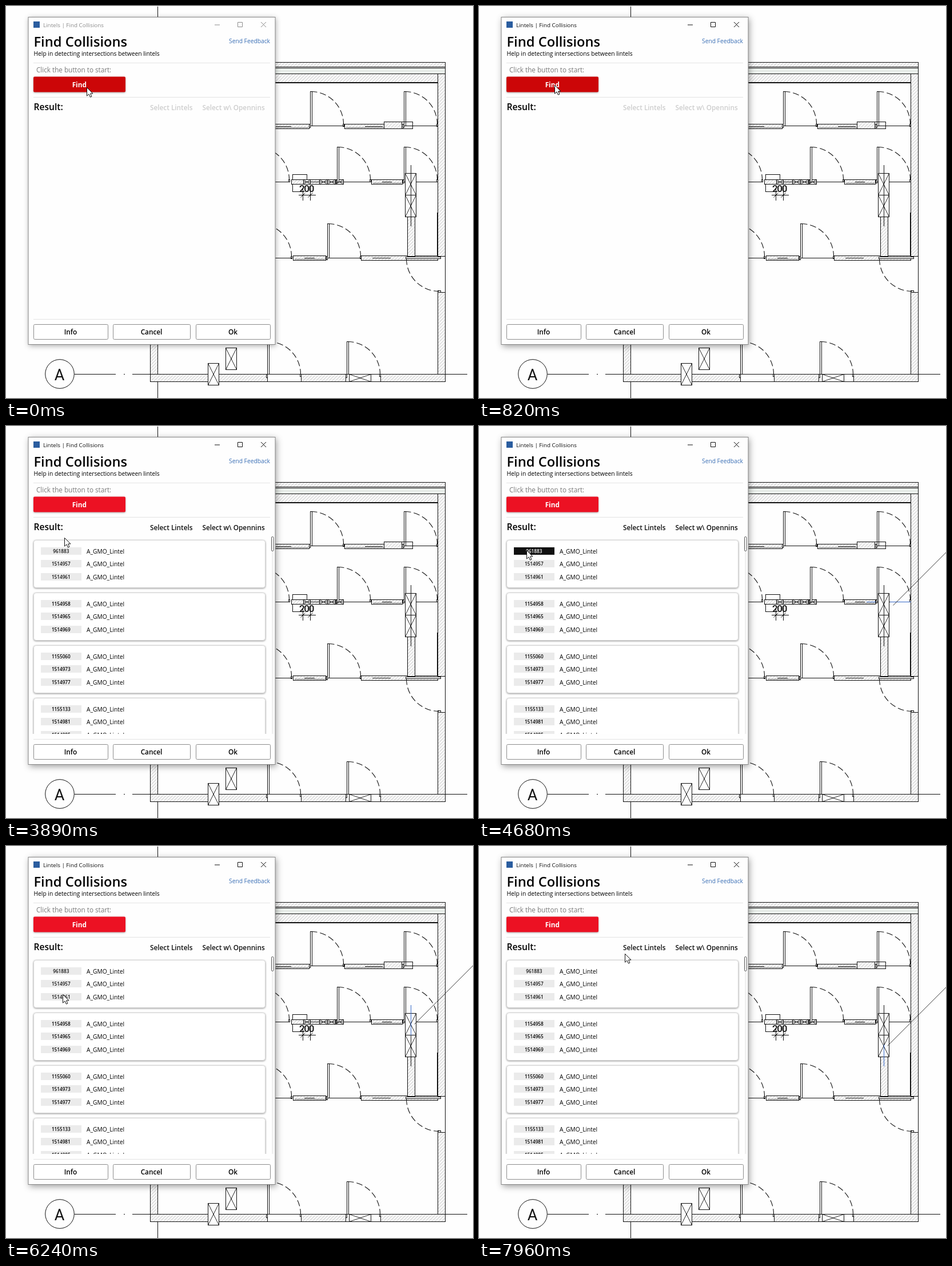
Recreate the animation shown at these times as an HTML page. Size 817 by 685 pixels, loop 8 s.

```html
<!DOCTYPE html>
<html lang="en">
<head>
<meta charset="utf-8">
<title>Find Collisions</title>
<style>
  html, body { margin: 0; width: 100%; height: 100%; overflow: hidden; background: #fefefe; }
  svg { display: block; width: 817px; height: 685px; font-family: "Open Sans", "Noto Sans", sans-serif; }
  .plan { fill: none; stroke: #111; stroke-width: 1; }
  .crisp { shape-rendering: crispEdges; }
  .arc { stroke-dasharray: 11 5; stroke-width: 1.1; }
  .cad { font-family: Roboto, "Liberation Sans", sans-serif; fill: #111; stroke: none; }
  .semi { font-weight: 600; }
  .mid { text-anchor: middle; }
</style>
</head>
<body>
<svg id="stage" viewBox="0 0 817 685">
  <defs>
    <pattern id="hatch" width="4" height="4" patternUnits="userSpaceOnUse" patternTransform="rotate(45)">
      <rect width="4" height="4" fill="#fefefe"/>
      <path d="M2 0V4" stroke="#b4b4b4" stroke-width=".8"/>
    </pattern>
    <clipPath id="listClip"><rect x="40" y="190" width="420" height="348"/></clipPath>
  </defs>
  <rect width="817" height="685" fill="#fefefe"/>
  <g id="plan" class="plan" transform="translate(.5 .5)"></g>
  <g id="dialog"></g>
  <path id="cursor" d="M.5 .5V15.2L4 11.9L6.4 17.2L8.9 16.1L6.6 11H11Z" fill="#fff" stroke="#111" stroke-linejoin="round"/>
</svg>
<script>
const $ = id => document.getElementById(id);
const LOOP = 8000;

// Markup helpers
const path = (d, extra = '') => `<path d="${d}" ${extra}/>`;
const line = (d, extra = '') => path(d, `class="crisp" ${extra}`);
const rect = (x, y, w, h, extra = '') => `<rect x="${x}" y="${y}" width="${w}" height="${h}" ${extra}/>`;
const text = (x, y, size, str, extra = '') => `<text x="${x}" y="${y}" font-size="${size}" ${extra}>${str}</text>`;

// Floor plan helpers
const DOOR = 57;
const box = (x, y, w, h, fill = 'none') => rect(x, y, w, h, `class="crisp" fill="${fill}"`);
const wall = (x, y, w, h) => box(x, y, w, h, 'url(#hatch)');
const crossed = (x, y, w, h) => box(x, y, w, h, '#fefefe') +
  path(`M${x} ${y}l${w} ${h}M${x + w} ${y}l${-w} ${h}`, 'stroke-width=".9"');
const beam = (x, y, w) => wall(x, y, w, 8) +
  line(`M${x + 2} ${y + 6}h${w - 4}`, 'stroke="#777"') + line(`M${x + w * .35} ${y + 4}h${w * .3}`);
// The leaf swings from the wall face; the sill line runs along the wall axis.
const door = (x, face, sill) => box(x - 1, face - DOOR, 3, sill - face + DOOR, '#fefefe') +
  path(`M${x} ${face - DOOR}A${DOOR} ${DOOR} 0 0 1 ${x + DOOR} ${face}`, 'class="arc"') +
  line(`M${x} ${sill}h${DOOR}`) + box(x + DOOR - 1, face, 2, 4) + box(x - 3, face, 2, 6);

function planMarkup() {
  const axes = line('M265 0V685M119 643H191M205 643h2M220 643H806') +
    '<circle cx="93.5" cy="642.5" r="25.3"/>' + text(93, 653, 27, 'A', 'class="cad mid"');

  const shell = wall(440, 98, 328, 8) + rect(440, 108, 328, 10, 'fill="#e9eeea" class="crisp"') +
    wall(440, 118, 328, 15) + line('M440 134H755') +
    wall(755, 118, 13, 319) + line('M768 98V656M755 360V437M754 360V437') +
    wall(755, 500, 13, 156) + wall(252, 560, 13, 96) + wall(252, 643, 205, 13) +
    wall(516, 643, 78, 13) + wall(655, 643, 113, 13);

  const upper = beam(440, 206, 90) + beam(592, 206, 102) + door(533, 206, 209) + door(697, 206, 209) +
    wall(661, 202, 31, 12) + box(661, 202, 50, 12);

  const middle = door(438, 303, 307) + wall(499, 303, 91, 8) + box(501, 294, 25, 9) +
    line('M501 311V324H515') + crossed(520, 303, 12, 8) +
    [548, 562, 576].map(x => crossed(x, 303, 14, 8)).join('') +
    door(580, 303, 307) + line('M520 307H606') + beam(639, 303, 54) + door(697, 303, 307) +
    text(525, 324, 17, '200', 'class="cad mid" font-weight="500" letter-spacing="-1.3"') +
    line('M511 330H541M519 318V339M532 314V339') + path('M515 334l8 -8M528 334l8 -8');

  const lower = door(442, 437, 440) + beam(502, 436, 57) + door(563, 437, 440) +
    wall(621, 436, 134, 8) + line('M640 440H672') + wall(702, 368, 13, 69) +
    box(699, 438, 61, 3, '#fefefe') + line('M755 437H768M755 500H768') + box(755, 497, 5, 3) +
    path('M700 441A57 57 0 0 0 757 498', 'class="arc"');

  const bottom = door(458, 643, 643) + door(597, 643, 643) + line('M457 656H516M594 656H655') +
    crossed(600, 643, 38, 13) + crossed(384, 597, 19, 38) + crossed(353, 624, 19, 38);

  const columns = crossed(698, 292, 19, 38) + crossed(698, 330, 19, 38) + line('M708 277V384');
  const picks = line('', 'id="pick" stroke="#3568c8"') + path('', 'id="leader" stroke-width=".8"');
  return axes + shell + upper + middle + lower + bottom + columns + picks;
}

// Dialog
const groups = [
  [961883, 1514957, 1514961],
  [1154958, 1514965, 1514969],
  [1155060, 1514973, 1514977],
  [1155133, 1514981, 1514985],
];

const card = (ids, n) => {
  const top = 199 + n * 92;
  return rect(48.5, top + .5, 405, 83, 'rx="4" fill="#fff" stroke="#d2d2d2" style="filter:drop-shadow(0 1px 1.5px #0006)"') +
    ids.map((id, i) => {
      const y = top + 13 + i * 22.4;
      return rect(61, Math.round(y), 71, 13, 'class="chip" fill="#ebebeb"') +
        text(96.3, y + 10, 8.2, id, 'class="chipText mid semi"') +
        text(141, y + 11, 10.2, 'A_GMO_Lintel');
    }).join('');
};

const footButton = (x, w, label) => rect(x + .5, 556.5, w, 26, 'rx="2" fill="#fff" stroke="#8c8c8c"') +
  text(x + w / 2, 574, 11.8, label, 'class="semi mid"');

function dialogMarkup() {
  const rules = line('M48 99.5H462M48 159.5H462M48 547.5H462', 'stroke="#e4e4e4"');
  return rect(39, 19, 432, 573, 'id="frame" fill="#fff"') +
    rect(39, 19.5, 432, 572, 'fill="#fefefe" stroke="#858585"') +
    rect(48, 27, 11, 11, 'fill="#2a5d9f"') +
    text(65, 36.5, 9.85, 'Lintels | Find Collisions', 'id="title"') +
    path('M365 33h9M405.5 28.5h8v8h-8zM446 28l9 9M455 28l-9 9', 'id="controls" fill="none"') +
    text(48.5, 71, 23.7, 'Find Collisions', 'class="semi"') +
    text(48.5, 87, 10.25, 'Help in detecting intersections between lintels') +
    text(390, 65, 10.25, 'Send Feedback', 'fill="#3a6fb5"') + rules +
    text(53, 116, 11.7, 'Click the button to start:', 'fill="#7a7a7a"') +
    rect(48, 123.5, 161, 27, 'id="find" rx="2" style="filter:drop-shadow(0 1px 1.5px #0005)"') +
    text(128.3, 142, 11.8, 'Find', 'class="mid" font-weight="700" fill="#fff"') +
    text(48.5, 182, 15.6, 'Result:', 'class="semi"') +
    '<g id="actions" class="semi">' + text(252, 182, 11.8, 'Select Lintels') +
    text(343.5, 182, 11.8, 'Select w\\ Opennins') + '</g>' +
    '<g id="results">' + `<g clip-path="url(#listClip)">${groups.map(card).join('')}</g>` +
    rect(465, 194, 3, 344, 'fill="#f1f1f1"') +
    rect(464.5, 193.5, 3.5, 25, 'rx="1.7" fill="#fff" stroke="#555"') + '</g>' +
    footButton(48, 130, 'Info') + footButton(187, 135, 'Cancel') + footButton(332, 130, 'Ok');
}

$('plan').innerHTML = planMarkup();
$('dialog').innerHTML = dialogMarkup();
const chips = document.querySelectorAll('.chip');
const chipTexts = document.querySelectorAll('.chipText');

// Motion: time, x, y
const cursorKeys = [
  [0, 141, 142], [30, 141, 142], [130, 139, 150], [310, 132, 138], [3680, 132, 138],
  [4030, 86, 225], [4200, 86, 225], [4270, 83, 217], [5170, 83, 217], [5440, 88, 240],
  [6060, 88, 240], [6240, 99, 259], [6370, 98, 266], [6750, 98, 266], [6960, 99, 267],
  [7480, 99, 267], [7960, 255, 188], [LOOP, 255, 188],
];
const hovers = [[4200, 5200], [5340, 6090], [6260, 7510]];
const picks = [
  { from: 4680, line: 'M677 307H693M718 307H755', leader: 'M724 313L817 220' },
  { from: 5820, line: 'M708 277V330', leader: 'M714 311L817 208' },
  { from: 6750, line: 'M708 346V384', leader: 'M714 349L817 246' },
];

const clamp = v => Math.max(0, Math.min(1, v));
const ramp = (t, start, span) => clamp((t - start) / span);
const ease = u => u * u * (3 - 2 * u);
const mix = (a, b, u) => a + (b - a) * u;
const blend = (a, b, u) => `rgb(${a.map((v, i) => Math.round(mix(v, b[i], u)))})`;

function cursorAt(t) {
  const i = Math.max(1, cursorKeys.findIndex(k => k[0] > t));
  const [t0, x0, y0] = cursorKeys[i - 1], [t1, x1, y1] = cursorKeys[i];
  const u = ease(ramp(t, t0, t1 - t0));
  return [mix(x0, x1, u), mix(y0, y1, u)].map(Math.round);
}

function draw(t) {
  const active = t >= 820, found = t >= 3000;
  $('frame').style.filter = active
    ? 'drop-shadow(2px 3px 6px rgba(0,0,0,.38))' : 'drop-shadow(1px 2px 5px rgba(0,0,0,.32))';
  $('title').setAttribute('fill', active ? '#111' : '#8c8c8c');
  $('controls').setAttribute('stroke', active ? '#111' : '#8c8c8c');
  $('actions').setAttribute('fill', found ? '#111' : '#cdcdcd');
  $('results').setAttribute('visibility', found ? 'visible' : 'hidden');
  $('find').setAttribute('fill', blend([204, 6, 8], [236, 17, 35], ramp(t, 3730, 110)));

  hovers.forEach(([on, off], i) => {
    const u = ramp(t, on, 70) - ramp(t, off, 70);
    chips[i].setAttribute('fill', blend([235, 235, 235], [17, 17, 17], u));
    chipTexts[i].setAttribute('fill', u > .5 ? '#fff' : '#111');
  });

  const pick = picks.filter(p => t >= p.from).pop();
  $('pick').setAttribute('d', pick ? pick.line : '');
  $('leader').setAttribute('d', pick ? pick.leader : '');
  $('cursor').setAttribute('transform', `translate(${cursorAt(t)})`);
}

const start = performance.now();
function tick() {
  draw((performance.now() - start) % LOOP);
  requestAnimationFrame(tick);
}
tick();
</script>
</body>
</html>
```
